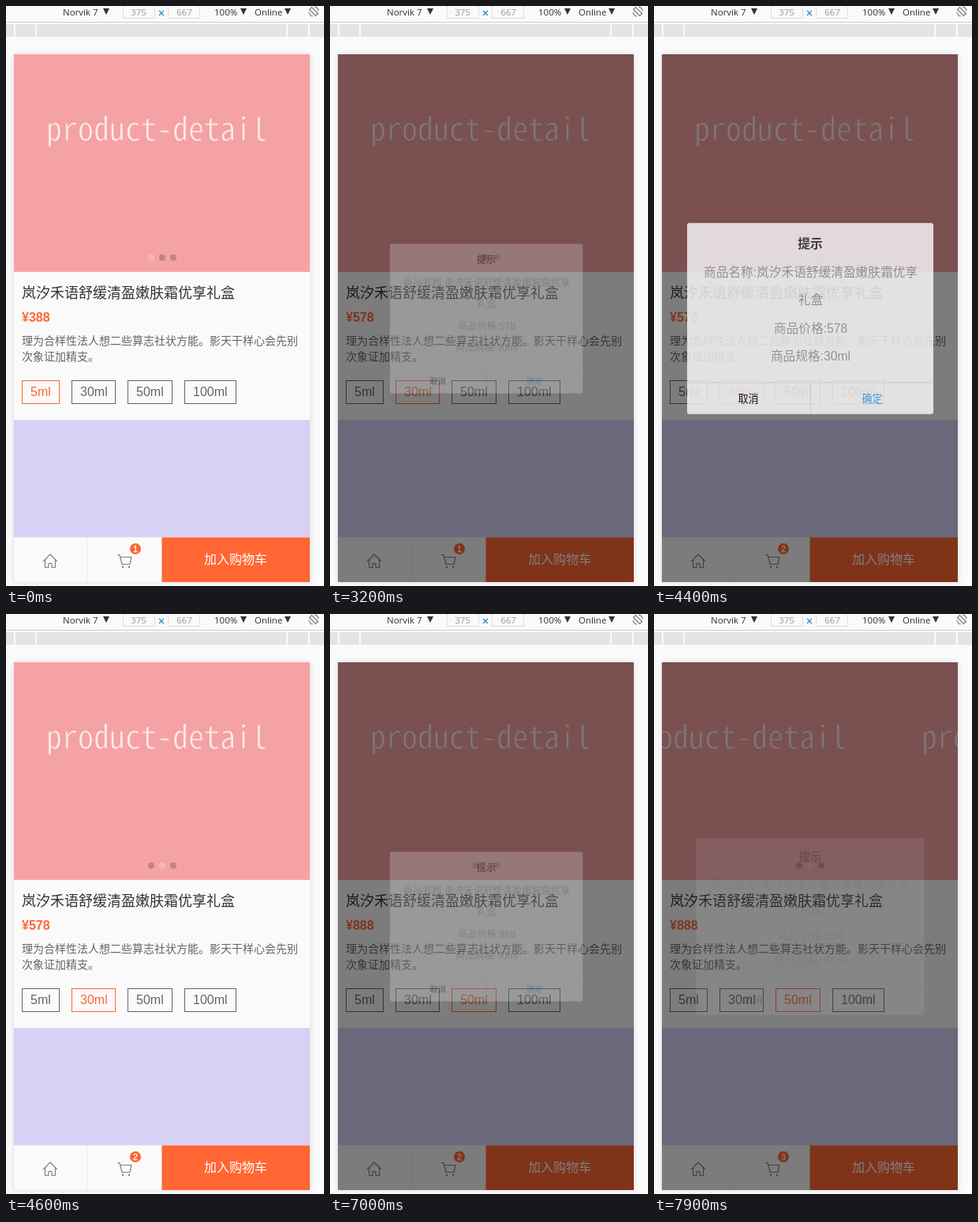
An HTML page that plays this animation: 403x733 px, repeating every 8 s.

```html
<!DOCTYPE html>
<html lang="zh-CN">
<head>
<meta charset="utf-8">
<style>
html, body { margin: 0; width: 100%; height: 100%; overflow: hidden; background: #fafafa }
svg { display: block; font: 16px "Liberation Sans", Arial, "Noto Sans CJK SC", sans-serif }
.bar { font: 11.5px "Open Sans", "Noto Sans", sans-serif; fill: #333 }
.bar rect { fill: none; stroke: #ddd }
.slide { font: 40px "Noto Sans Mono CJK SC", "Noto Sans Mono CJK JP", "Noto Sans Mono", monospace; fill: #fdecec; stroke: #f5a2a4; stroke-width: 1 }
.mid { text-anchor: middle }
.icon { fill: none; stroke: #808080; stroke-width: 1.2; stroke-linejoin: round; stroke-linecap: round }
</style>
</head>
<body>
<svg width="403" height="733" viewBox="0 0 403 733">
  <clipPath id="screen"><path d="M10 61h375v667H10z"/></clipPath>

  <g class="bar">
    <text x="72" y="12">Norvik 7</text>
    <text x="264" y="12">100%</text>
    <text x="315" y="12">Online</text>
    <path d="M123 3h8l-4 8zM297 3h8l-4 8zM353 3h8l-4 8z"/>
    <rect x="148.500" y="-4.500" width="40" height="20"/>
    <rect x="205.500" y="-4.500" width="40" height="20"/>
    <g class="mid" fill="#999"><text x="168" y="12">375</text><text x="226" y="12">667</text></g>
    <path d="M194 6l6 6m0-6l-6 6" stroke="#2b8fd0" stroke-width="1.300"/>
    <path d="M384.500 4.500l3-3 8 8-3 3zM391 1a6 6 0 0 1 5 5M389 13a6 6 0 0 1-5-5" fill="none" stroke="#777" stroke-width="1.200"/>
  </g>
  <path d="M0 20.500h403" stroke="#ccc"/>
  <path d="M0 23h403v16H0z" fill="#e4e4e4"/>
  <path d="M11 23v16M38 23v16M356 23v16M384 23v16" stroke="#fafafa" stroke-width="2"/>

  <path d="M10 61h375v667H10z" fill="#fafafa" style="filter:drop-shadow(0 0 3px #0002)"/>
  <g clip-path="url(#screen)">
    <path d="M10 61h375v275H10z" fill="#f5a2a4"/>
    <g id="slides" class="slide">
      <text x="51" y="170">product-detail</text>
      <text x="426" y="170">product-detail</text>
    </g>
    <g id="dots" opacity=".2">
      <circle cx="184" cy="318" r="4"/><circle cx="198" cy="318" r="4"/><circle cx="212" cy="318" r="4"/>
    </g>

    <text x="20" y="369" font-size="18" fill="#333" class="name"></text>
    <text id="price" x="20" y="399" font-weight="bold" fill="#f63"></text>
    <g font-size="14" fill="#666">
      <text x="20" y="428">理为合样性法人想二些算志社状方能。影天干样心会先别</text>
      <text x="20" y="448">次象证加精支。</text>
    </g>
    <g id="sizes"></g>

    <path d="M10 523h375v148H10z" fill="#d6d1f5"/>
    <path d="M10 671h188v57H10z" fill="#fafafa"/>
    <path d="M10 671.500h188M103.500 672v56" stroke="#eee"/>
    <path d="M197.500 671.500H385V728H197.500z" fill="#f63"/>
    <text class="mid" x="291" y="705" fill="#fff">加入购物车</text>
    <path class="icon" d="M47.500 701.500l8.500-8.500 8.500 8.500M49.500 700v9.500h4.500v-5h4v5h4.500v-9.500"/>
    <path class="icon" d="M141.500 693.500h2.500l3 12h10l2-9h-14"/>
    <g fill="#808080"><circle cx="148" cy="709" r="1.200"/><circle cx="156" cy="709" r="1.200"/></g>
    <circle cx="164" cy="686" r="7" fill="#f63"/>
    <text id="badge" class="mid" x="164" y="689.500" font-size="10" fill="#fff" stroke="#fff" stroke-width=".4"></text>

    <path id="mask" d="M10 61h375v667H10z" opacity=".5"/>
    <g id="dialog" class="mid">
      <rect x="39" y="272" width="318" height="246" rx="3" fill="#fafafa"/>
      <text x="198" y="304" font-weight="bold" fill="#333">提示</text>
      <g fill="#999">
        <text x="198.500" y="341" id="line1"></text>
        <text x="198.500" y="377" id="line2"></text>
        <text x="198.500" y="413" id="line3"></text>
        <text x="198.500" y="449" id="line4"></text>
      </g>
      <path d="M39 477.500h318M198.500 478v40" stroke="#ddd"/>
      <g font-size="13.333">
        <text x="118" y="503" fill="#000">取消</text>
        <text x="278" y="503" fill="#26a2ff">确定</text>
      </g>
    </g>
  </g>
</svg>
<script>
const $ = id => document.getElementById(id);
const product = '岚汐禾语舒缓清盈嫩肤霜优享礼盒';
const sizes = [['5ml', 388, 20, 48], ['30ml', 578, 83, 56], ['50ml', 888, 154, 57], ['100ml', 0, 226, 66]];

document.querySelector('.name').textContent = product;
$('line1').textContent = '商品名称:' + product.slice(0, 13);
$('line2').textContent = product.slice(13);
$('sizes').innerHTML = sizes.map(([label, , x, w]) =>
  `<g><rect x="${x + .5}" y="473.5" width="${w - 1}" height="29" fill="none"/>
   <text x="${x + 11}" y="493" stroke="none">${label}</text></g>`).join('');

const clamp = v => Math.max(0, Math.min(1, v));

// Cubic Bézier easing, solved by bisection
function bezier(x1, y1, x2, y2) {
  const at = (a, b, s) => 3 * a * s * (1 - s) ** 2 + 3 * b * s * s * (1 - s) + s ** 3;
  return x => {
    x = clamp(x);
    if (x === 0 || x === 1) return x;
    let lo = 0, hi = 1;
    for (let i = 0; i < 24; i++) {
      const s = (lo + hi) / 2;
      if (at(x1, x2, s) < x) lo = s; else hi = s;
    }
    return at(y1, y2, lo);
  };
}
const ease = bezier(.25, .1, .25, 1);
const easeInOut = bezier(.42, 0, .58, 1);

function draw(t) {
  const pick = t < 1300 ? 0 : t < 6300 ? 1 : 2;
  const [label, price] = sizes[pick];
  $('price').textContent = '¥' + price;
  $('line3').textContent = '商品价格:' + price;
  $('line4').textContent = '商品规格:' + label;
  [...$('sizes').children].forEach((g, i) => {
    const color = i === pick ? '#f63' : '#666';
    g.setAttribute('fill', color);
    g.setAttribute('stroke', color);
  });
  $('badge').textContent = t < 4400 ? 1 : t < 7800 ? 2 : 3;

  const slideStart = t < 3500 ? 3200 : 7800;
  const shift = -375 * easeInOut((t - slideStart) / 300);
  $('slides').setAttribute('transform', `translate(${shift})`);
  const active = t < 3500 ? 0 : 1;
  [...$('dots').children].forEach((dot, i) => dot.setAttribute('fill', i === active ? '#fff' : '#000'));

  const shown = t >= 3200 && t < 4600 || t >= 7000;
  const [openAt, closeAt] = t < 4600 ? [3166, 4370] : [6966, 7770];
  const opened = ease((t - openAt) / 200), closed = ease((t - closeAt) / 200);
  const scale = .7 + .3 * opened - .1 * closed;
  $('mask').style.display = $('dialog').style.display = shown ? '' : 'none';
  $('dialog').setAttribute('opacity', opened * (1 - closed));
  $('dialog').setAttribute('transform', `translate(198.5 395) scale(${scale}) translate(-198.5 -395)`);
}

// The screen refreshes ten times a second
function tick() {
  draw(Math.floor(performance.now() % 8000 / 100) * 100);
  requestAnimationFrame(tick);
}
tick();
</script>
</body>
</html>
```
